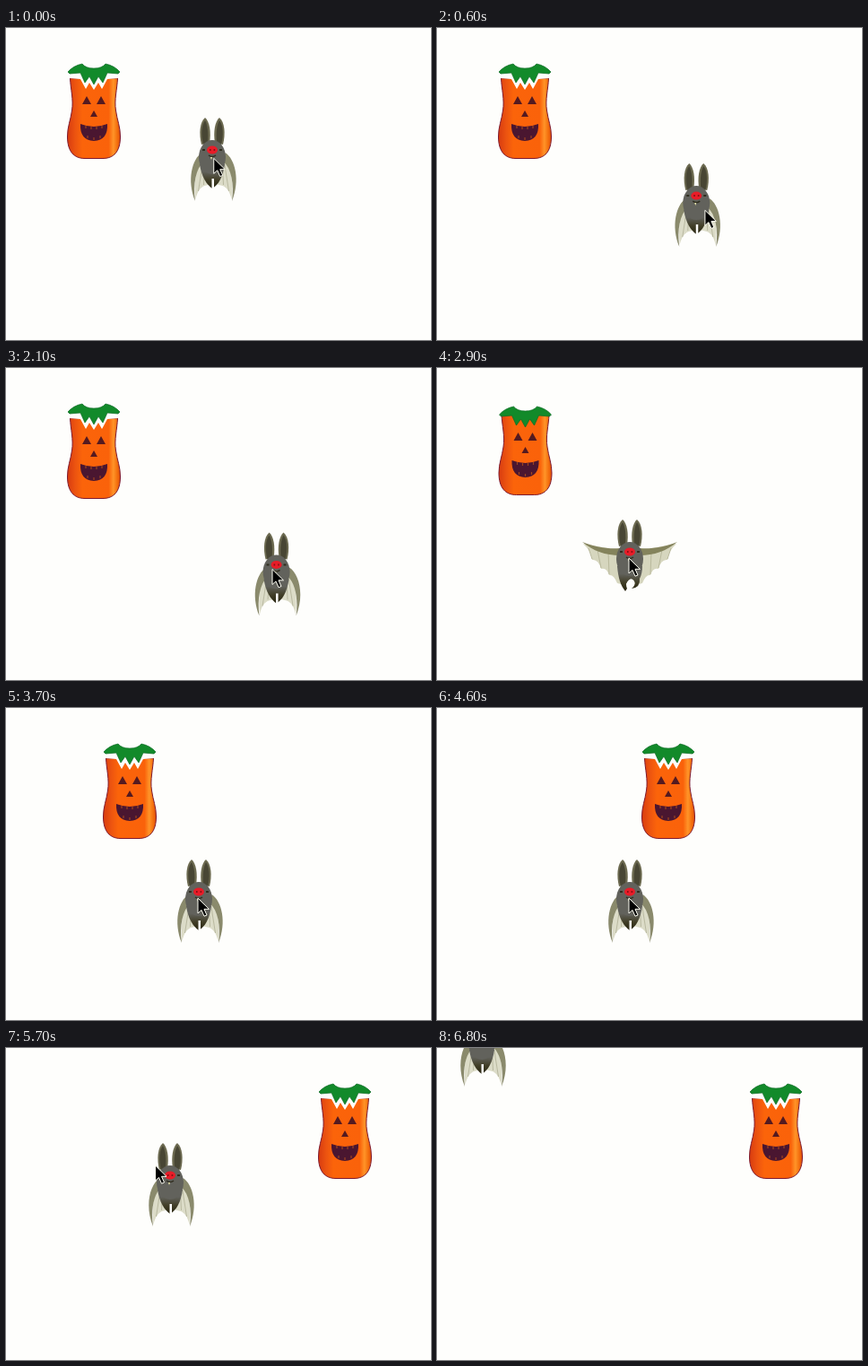
Write an HTML page that moves like this. It is 474 px wide and 348 px high and loops after 6900 ms.

```html
<!DOCTYPE html>
<html lang="en">
<head>
<meta charset="utf-8">
<title>Bat and pumpkin</title>
<style>
  html, body { margin: 0; width: 100%; height: 100%; overflow: hidden; background: #fefefc; }
  svg { display: block; width: 474px; height: 348px; }
</style>
</head>
<body>
<svg viewBox="0 0 474 348">
  <defs>
    <linearGradient id="skin">
      <stop offset="0" stop-color="#d83c10"/>
      <stop offset=".15" stop-color="#ec5410"/>
      <stop offset=".28" stop-color="#fb640a"/>
      <stop offset=".78" stop-color="#fa620a"/>
      <stop offset=".87" stop-color="#ff9428"/>
      <stop offset=".94" stop-color="#f4700e"/>
      <stop offset="1" stop-color="#e0500c"/>
    </linearGradient>
    <linearGradient id="fur" x2="0" y2="1">
      <stop offset=".3" stop-color="#62625c"/>
      <stop offset=".65" stop-color="#423f28"/>
      <stop offset="1" stop-color="#26230e"/>
    </linearGradient>
    <g id="ear">
      <path d="M-8-36C-14-31-15-18-12-6L-3-8C-1-20-3-32-8-36Z" fill="#6c6a50"/>
      <path d="M-8-33C-12-28-13-17-10-6L-5-8C-4-19-5-28-8-33Z" fill="#484634"/>
    </g>
    <g id="foldedWing">
      <path d="M-13 8C-20 18-22 36-20 55C-18 46-15 42-10 40L-2 38V8Z" fill="#dcdcc8"/>
      <path d="M-12 14L-17 46M-10 18L-11 39" stroke="#b9b9a0" fill="none"/>
      <path d="M-13 3C-24 10-30 34-20.5 57C-23 38-20 21-11 13Z" fill="#8a8a6c"/>
    </g>
    <g id="openWing">
      <path d="M-52-9Q-43-1-42 9Q-35 8-32 19Q-26 17-23 26Q-18 25-14 35L-3 38V0Z" fill="#d6d6be"/>
      <path d="M-46-4L-42 8M-36-2L-32 18M-24 0L-23 25" stroke="#b9b99c" fill="none"/>
      <path d="M-53-11C-38-5-24-3-11-4V4C-27 4-41-1-53-11Z" fill="#84835c"/>
    </g>
    <g id="head">
      <use href="#ear"/><use href="#ear" transform="scale(-1 1)"/>
      <ellipse cy="8" rx="15" ry="19" fill="#62625c"/>
      <path d="M-11 0h3M8 0h3" stroke="#302e20" stroke-width="2"/>
      <ellipse rx="6" ry="4.5" fill="#e81c28"/>
      <path d="M-3 0h1.6M1.6 0h1.6" stroke="#8a1014" stroke-width="2"/>
      <path d="M-4 6Q0 9 4 6" stroke="#302e20" stroke-width="1.5" fill="none"/>
      <path d="M-2 8l1 3 1-3Z" fill="#f4f0b0"/>
    </g>
  </defs>

  <g id="pumpkin">
    <g id="body">
      <path d="M-26.5 56C-26 68-22.5 80-24.5 92C-26 103-29.5 110-29.5 121C-29.5 138-22 145.500-10 145.500H10C22 145.500 29.500 138 29.500 121C29.500 110 26 103 24.500 92C22.500 80 26 68 26.500 56Z" fill="url(#skin)" stroke="#7c1a30"/>
      <path d="M-13 85L-8 76L-3 85ZM3 85L8 76L13 85ZM-4 99L0 92L4 99Z" fill="#541a20"/>
      <path d="M-15 107Q0 113 15 107Q16 125 0 126Q-16 125-15 107Z" fill="#4a1630"/>
      <path d="M-9 109v3M-3 110v3M3 110v3M9 109v3M-7 123v-3M0 125v-3M7 123v-3" stroke="#9c4420" stroke-width="1.2"/>
      <path id="gap" d="M-28 48H28L27 56L15 57L9 68L5 61L0 69L-5 61L-9 68L-15 57L-27 56Z" fill="#fefefc"/>
    </g>
    <path id="lid" d="M-29 49Q-23 42-13 40Q-9 45 0 45Q9 45 13 40Q23 42 29 49L27 51L15 50L10 61L5 54L0 63L-5 54L-10 61L-15 50L-27 51Z" fill="#128a2a" stroke="#0d6a24" stroke-width=".7"/>
  </g>

  <g id="bat">
    <g id="folded">
      <g transform="translate(1.5)">
        <use href="#foldedWing"/><use href="#foldedWing" transform="scale(-1 1)"/>
      </g>
      <path d="M-14 16C-12 30-6 39 0 43C7 39 12 30 14 16Z" fill="url(#fur)"/>
      <path d="M-.5 32H2V44H-.5Z" fill="#fefefc"/>
      <use href="#head"/>
    </g>
    <g id="open">
      <use href="#openWing"/><use href="#openWing" transform="scale(-1 1)"/>
      <path d="M-14 16C-13 29-10 38-5 44L-3 41L-4 36Q1 27 5 33Q7 37 2 41Q12 40 11 30Q14 24 14 16Z" fill="url(#fur)"/>
      <path d="M-3 41L-4 36Q1 27 5 33Q7 37 1 41Z" fill="#fefefc"/>
      <use href="#head"/>
    </g>
  </g>

  <path id="cursor" d="M0 0V17L4 13.4L7 20.2L10 19L7 12.3H12.5Z" fill="#000" stroke="#fffff4"/>
</svg>
<script>
const LOOP = 6900, TICK = 100;

// mouse strokes: time, x, y
const strokes = [
  [0, 230, 136], [900, 310, 205], [1300, 297, 230], [1700, 310, 224],
  [2700, 286, 211], [2900, 215, 205], [5000, 215, 205], [5700, 183, 142],
  [5900, 152, 106], [6800, 50, -14], [6900, 50, -40]
];

const el = id => document.getElementById(id);
const place = (id, x, y) => el(id).setAttribute('transform', `translate(${x} ${y})`);
const show = (id, on) => el(id).setAttribute('display', on ? 'inline' : 'none');
const clamp = (v, lo, hi) => Math.min(hi, Math.max(lo, v));

function batAt(t) {
  const i = Math.max(1, strokes.findIndex(s => s[0] >= t));
  const [t0, x0, y0] = strokes[i - 1], [t1, x1, y1] = strokes[i];
  const p = (t - t0) / (t1 - t0), ease = p * p * (3 - 2 * p);
  return [x0 + (x1 - x0) * ease, y0 + (y1 - y0) * ease];
}

// both characters switch pose together; the beat rests briefly at 2.9 s
function isOpen(t) {
  const beat = t - clamp(t - 2900, 0, 200);
  return beat % 1000 >= 700;
}

function draw(now) {
  const t = Math.floor(now % LOOP / TICK) * TICK;
  const open = isOpen(t);
  const [cx, cy] = batAt(t + TICK);
  const hops = clamp(Math.floor((t - 3440) / 130), 0, 14);

  place('bat', ...batAt(t));
  place('cursor', cx - 1, cy + 7);   // the bat trails the pointer
  show('open', open);
  show('folded', !open);

  place('pumpkin', 98 + 20 * hops + (open ? 0.5 : 0), 0);
  place('body', 0, open ? -4 : 0);
  place('lid', 0, open ? 3 : 0);
  show('gap', !open);
}

const start = performance.now();
function frame() {
  draw(performance.now() - start);
  requestAnimationFrame(frame);
}
frame();
</script>
</body>
</html>
```
